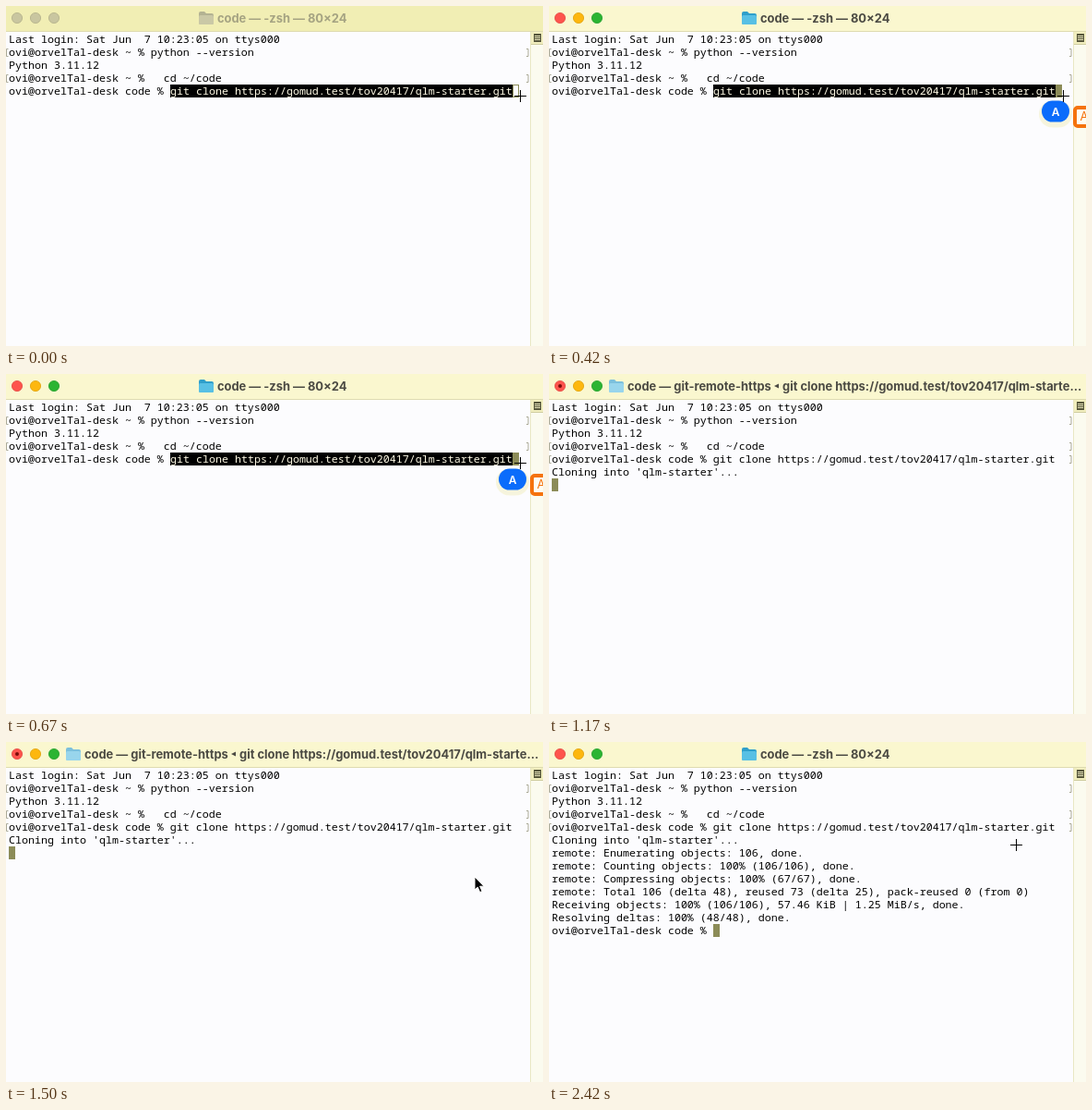
Write an HTML page that moves like this. It is 582x368 px and loops after 3910 ms.

```html
<!DOCTYPE html>
<html lang="en">
<head>
<meta charset="utf-8">
<title>Terminal</title>
<style>
  html, body { margin: 0; width: 100%; height: 100%; overflow: hidden; background: #fcfcfe; }
  svg { display: block; width: 582px; height: 368px; }
  text { white-space: pre; }
  .mono { font: 500 11.667px "Noto Sans Mono", monospace; }
  .ui { font: 700 12.9px Inter, sans-serif; }
</style>
</head>
<body>
<svg id="stage" viewBox="0 0 582 368"></svg>
<script>
const LOOP = 3910;
const CELL = 7, ROW = 14, LEFT = 3, TOP = 29;
const OLIVE = '#8c8c58';
const REPO = 'qlm-starter';
const COMMAND = `git clone https://gomud.test/tov20417/${REPO}.git`;
const HOST = 'ovi@orvelTal-desk';
const PROMPT = `${HOST} code % `;

const history = [
  'Last login: Sat Jun  7 10:23:05 on ttys000',
  `${HOST} ~ % python --version`,
  'Python 3.11.12',
  `${HOST} ~ %   cd ~/code`,
  PROMPT + COMMAND
];
const cloning = `Cloning into '${REPO}'...`;
const report = [
  'remote: Enumerating objects: 106, done.',
  'remote: Counting objects: 100% (106/106), done.',
  'remote: Compressing objects: 100% (67/67), done.',
  'remote: Total 106 (delta 48), reused 73 (delta 25), pack-reused 0 (from 0)',
  'Receiving objects: 100% (106/106), 57.46 KiB | 1.25 MiB/s, done.',
  'Resolving deltas: 100% (48/48), done.',
  PROMPT
];

// Each step changes only the listed parts of the previous state.
const steps = [
  { at: 0, focused: false, selected: true, lines: history, caret: [78, 4], cross: [557, 97] },
  { at: 170, focused: true, badge: { rx: 13, ry: 10.3, blue: '#4b8ffb', orange: '#fb9318' } },
  { at: 250, badge: { rx: 14.4, ry: 11, blue: '#2079fc', orange: '#f88012' } },
  { at: 420, badge: { rx: 15, ry: 11.5, blue: '#0a6cfb', orange: '#f5730e' } },
  { at: 670, cross: [557, 96] },
  { at: 1000, selected: false, caret: [0, 5], cross: null, badge: { orange: '#f5730e' } },
  { at: 1170, lines: [...history, cloning], caret: [0, 6], badge: null, busy: true },
  { at: 1420, arrow: [507, 106] },
  { at: 1500, arrow: [508, 146] },
  { at: 1670, arrow: [506, 109] },
  { at: 2420, lines: [...history, cloning, ...report], caret: [25, 12],
    busy: false, arrow: null, cross: [506, 111] }
];
let previous = {};
const states = steps.map(step => previous = { ...previous, ...step });

const rect = (x, y, w, h, fill, extra = '') =>
  `<rect x="${x}" y="${y}" width="${w}" height="${h}" fill="${fill}" ${extra}/>`;
const path = (d, fill, extra = '') => `<path d="${d}" fill="${fill}" ${extra}/>`;
const label = (x, y, str, fill, cls = 'mono', extra = '') =>
  `<text x="${x}" y="${y}" fill="${fill}" class="${cls}" ${extra}>${str}</text>`;

function folder(x, focused, busy) {
  const [back, front] = !focused ? ['#b3b292', '#cac8a6']
    : busy ? ['#7cc0dc', '#98d5ec'] : ['#2f9fca', '#58c0e4'];
  return path(`M${x} 8q0-2 2-2h4l2 2h6q2 0 2 2v8q0 2-2 2h-12q-2 0-2-2z`, back) +
    rect(x, 10, 16, 10, front, 'rx="1.5"');
}

function titleBar({ focused, busy }) {
  const ink = focused ? '#4b4a43' : '#a5a382';
  const lights = focused ? ['#fe544d', '#fdb70e', '#2bb432'] : Array(3).fill('#c9c6a0');
  const edge = focused ? ['#e2463f', '#e0a008', '#1f9d28'] : Array(3).fill('#b2af8a');
  let out = rect(0, 0, 582, 27, focused ? '#faf7cf' : '#f1eeb4') + rect(0, 27, 582, 1, '#dedbb0');
  lights.forEach((fill, i) => {
    out += `<circle cx="${12 + 20 * i}" cy="13" r="5.6" fill="${fill}" stroke="${edge[i]}" stroke-width=".8"/>`;
  });
  if (!busy) return out + folder(209, focused) + label(229, 17.5, 'code — -zsh — 80×24', ink, 'ui');
  return out + '<circle cx="12" cy="13" r="2" fill="#7b0d09"/>' + folder(65, focused, true) +
    label(85, 17.5, 'code — git-remote-https', ink, 'ui') +
    path('M249 10.5v5l-5-2.5z', ink) +
    label(253, 17.5, COMMAND.slice(0, -5) + '...', ink, 'ui');
}

function scrollColumn() {
  const stripes = [32.5, 34.5, 36.5].map(y => `M573 ${y}h6`).join('');
  return rect(568, 28, 14, 340, '#fbfbef') + rect(568, 28, 1, 340, '#e9e7c4') +
    rect(569, 28, 13, 13, '#f0edbd') + rect(569, 41, 13, 1, '#d0cda0') +
    rect(572, 30, 8, 9, '#55553a') + path(stripes, 'none', 'stroke="#e8e6bd"');
}

function brackets(row) {
  const y = TOP + row * ROW + 3.5;
  return path(`M2.5 ${y}h-2v8h2M564 ${y}h2v8h-2`, 'none', 'stroke="#aaa996"');
}

function caret([col, row], focused) {
  const x = LEFT + col * CELL, y = TOP + row * ROW;
  return focused ? rect(x, y, CELL, ROW, OLIVE)
    : rect(x + .5, y + .5, CELL - 1, ROW - 1, 'none', `stroke="${OLIVE}"`);
}

function terminal({ lines, selected, focused, caret: spot }) {
  let out = [1, 3, ...(selected ? [] : [4])].map(brackets).join('') + caret(spot, focused);
  lines.forEach((line, row) => {
    const y = TOP + row * ROW + 11;
    if (!selected || row !== 4) return out += label(LEFT, y, line, '#000');
    const x = LEFT + PROMPT.length * CELL;
    out += label(LEFT, y, PROMPT, '#000') +
      rect(x, y - 11, COMMAND.length * CELL, ROW, '#000') + label(x, y, COMMAND, '#fffbe6');
  });
  return out;
}

function inputBadge({ rx, ry, blue, orange }) {
  const box = rect(570, 110, 30, 20, '#fffdf2', `rx="3" stroke="${orange}" stroke-width="4"`) +
    label(575.5, 124, 'A', orange, 'ui', 'style="font-weight:400"');
  if (!rx) return box;
  const pill = (dy, grow, fill) => rect(549 - rx - grow, 114 - ry - grow + dy,
    2 * (rx + grow), 2 * (ry + grow), fill, `rx="${ry + grow}"`);
  return box + pill(3, 3, '#f4f1c8" fill-opacity=".6') + pill(0, 0, blue) +
    label(549, 118.5, 'A', '#fff', 'ui', 'text-anchor="middle" style="font-size:12px;font-weight:600"');
}

const crosshair = ([x, y]) =>
  path(`M${x - 6} ${y + .5}h13M${x + .5} ${y - 6}v13`, 'none', 'stroke="#000"');
const pointer = ([x, y]) =>
  path(`M${x} ${y}v14l3.2-3 2.4 5.6 2.4-1-2.4-5.4h4.4z`, '#000', 'stroke="#fff" stroke-width="1"');

function draw(s) {
  return rect(0, 0, 582, 368, '#fcfcfe') + titleBar(s) + scrollColumn() + terminal(s) +
    (s.badge ? inputBadge(s.badge) : '') +
    (s.cross ? crosshair(s.cross) : '') + (s.arrow ? pointer(s.arrow) : '');
}

const stage = document.getElementById('stage');
const start = performance.now();
let shown;
function tick() {
  const t = (performance.now() - start) % LOOP;
  const state = states.findLast(s => s.at <= t);
  if (state !== shown) stage.innerHTML = draw(shown = state);
  requestAnimationFrame(tick);
}
tick();
</script>
</body>
</html>
```
